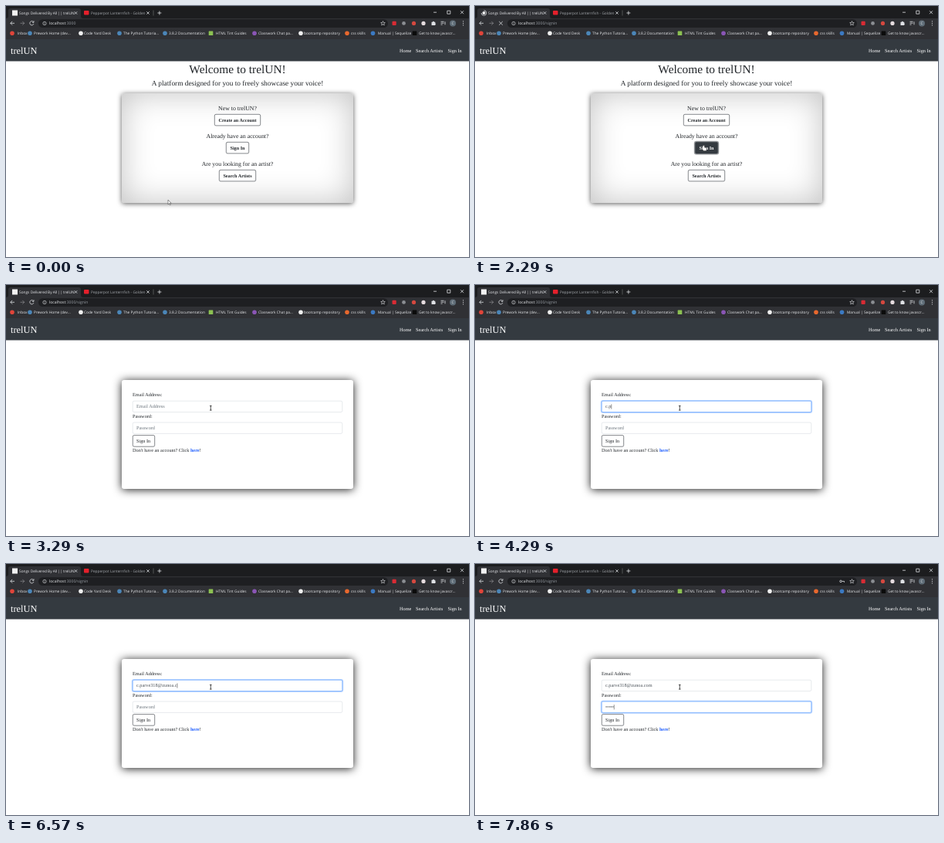
These frames come from a looping animation (600 px wide and 325 px high, 8 s). An HTML page:

```html
<!DOCTYPE html>
<html lang="en">
<head>
<meta charset="utf-8">
<title>trelUN</title>
<style>
  html, body { margin: 0; width: 100%; height: 100%; overflow: hidden; background: #fff; }
  .card { position: absolute; left: 150px; width: 300px; border-radius: 3px; background: #fff; }
  #homeCard { top: 113px; height: 142px; box-shadow: inset 0 0 42px #c2c2c2, 0 1px 6px rgba(0,0,0,.65); }
  #signCard { top: 123px; height: 141px; box-shadow: 0 1px 12px rgba(0,0,0,.9); }
  svg { position: absolute; left: 0; top: 0; }
  text { font-family: "Liberation Serif", serif; font-size: 6.25px; fill: #212529; text-rendering: geometricPrecision; white-space: pre; }
  .ui text { font-family: "Open Sans", "Noto Sans", sans-serif; font-size: 4.8px; fill: #e8eaed; }
  .line { fill: none; stroke: #dfe1e5; stroke-width: .8; }
  .mid text { text-anchor: middle; }
  .mid .q { font-size: 7.82px; }
  .mid .b { font-size: 6.2px; font-weight: bold; }
  .btn { fill: #fff; stroke: #343a40; stroke-width: .6; }
  .nav text { font-size: 6.3px; fill: #fff; }
  .field { fill: #fff; stroke: #ced4da; stroke-width: .5; }
  .field.on { stroke: #80b4ff; stroke-width: .9; }
  .halo { fill: none; stroke: #5b9bff; stroke-opacity: .45; stroke-width: 1.4; }
  .value { fill: #495057; }
  .value.empty { fill: #6c757d; }
</style>
</head>
<body>
<div class="card" id="homeCard"></div>
<div class="card" id="signCard"></div>
<svg width="600" height="325" viewBox="0 0 600 325">
  <g class="ui">
    <rect width="600" height="17" fill="#1c1d1f"/>
    <path d="M0 16 Q3 16 3 13 V6 Q3 3 6 3 H94 Q97 3 97 6 V13 Q97 16 100 16 H600 V43 H0Z" fill="#303135"/>
    <rect id="icon" x="8" y="5.5" width="7" height="7" fill="#f2f2f2"/>
    <g id="spinner">
      <circle cx="11.5" cy="9" r="2" fill="#f2f2f2"/>
      <path d="M11.5 5.7 A3.3 3.3 0 1 1 8.2 9" class="line"/>
    </g>
    <clipPath id="tabs"><path d="M17 0H89V17H17ZM109 0H183V17H109Z"/></clipPath>
    <g clip-path="url(#tabs)">
      <text x="17" y="10.8">Songs Delivered By All || trelUN</text>
      <text x="110" y="10.8" style="fill:#a3a7ac">Pepperpot Lanternfish - Golden</text>
    </g>
    <rect x="101" y="6" width="6.5" height="5.5" rx="1" fill="#e5202b"/>
    <path class="line" d="M88.8 7.3l3.4 3.4m0-3.4l-3.4 3.4M182.3 7.3l3.4 3.4m0-3.4l-3.4 3.4M196.4 9h5M198.9 6.5v5"/>
    <path class="line" stroke-width=".5" d="M191 5.5v7" opacity=".35"/>
    <path class="line" d="M554 8.2h4M571.8 6.2h4v4h-4zM589 6.2l4 4m0-4l-4 4"/>
    <path class="line" d="M11 22.3H5.8m2.4-2.4l-2.4 2.4 2.4 2.4"/>
    <path class="line" d="M18.5 22.3h5.2m-2.4-2.4l2.4 2.4-2.4 2.4" opacity=".45"/>
    <path id="reload" class="line" d="M35.6 20.8a2.6 2.6 0 1 0 .3 2.3M36 19.3v2h-2"/>
    <path id="stop" class="line" d="M31.2 20l4.6 4.6m0-4.6l-4.6 4.6"/>
    <rect x="42" y="17.2" width="453" height="10.8" rx="5.4" fill="#1e1f22"/>
    <circle class="line" cx="50" cy="22.5" r="2.2" style="stroke-width:.6"/>
    <path class="line" d="M50 22.2v1.4M50 21v.5" style="stroke-width:.6"/>
    <text x="56" y="24.4" style="font-size:5.1px">localhost<tspan id="path" fill="#9aa0a6"></tspan></text>
    <g id="key">
      <circle class="line" cx="474" cy="22.4" r="1.3"/><path class="line" d="M475.3 22.4h3.2v1.4"/>
    </g>
    <path class="line" style="stroke-width:.6" d="M488.5 19.6l.8 1.9 2 .1-1.6 1.3.6 2-1.8-1.1-1.8 1.1.6-2-1.6-1.3 2-.1z"/>
    <rect x="500.5" y="19.7" width="5.2" height="5.2" rx="1" fill="#d92b34"/>
    <circle cx="515.5" cy="22.4" r="2.4" fill="#8b8e93"/>
    <circle cx="528.5" cy="22.4" r="2.6" fill="#d5483f"/>
    <circle cx="541" cy="22.4" r="2.6" fill="#e6dcdf"/>
    <path d="M551.5 20.8h1.4a1 1 0 0 1 2 0h1.4v1.6a1 1 0 0 1 0 1.8v.9h-4.8z" fill="#dfe1e5"/>
    <path class="line" d="M563.5 20.3h4M563.5 22.2h4M563.5 24.1h2M569 20.3v4"/>
    <circle cx="579" cy="22.4" r="4" fill="#5f6d78"/>
    <text x="577.5" y="24.1">C</text>
    <path d="M592.5 19.8h.01M592.5 22.3h.01M592.5 24.8h.01" stroke="#dfe1e5" stroke-width="1.2" stroke-linecap="round"/>
    <g id="marks"></g>
  </g>

  <rect y="43" width="600" height="28.5" fill="#343a40"/>
  <g class="nav">
    <text x="6" y="61.7" style="font-size:12.4px">trelUN</text>
    <text x="510" y="59.6">Home</text>
    <text x="531" y="59.6">Search Artists</text>
    <text x="572.4" y="59.6">Sign In</text>
  </g>

  <g id="home" class="mid">
    <text x="300" y="86.7" style="font-size:15.4px">Welcome to trelUN!</text>
    <text x="300" y="102.6" style="font-size:9.33px">A platform designed for you to freely showcase your voice!</text>
    <text class="q" x="300" y="135">New to trelUN?</text>
    <rect class="btn" x="270.3" y="140.3" width="59.4" height="14.6" rx="1.7"/>
    <text class="b" x="300" y="149.7">Create an Account</text>
    <text class="q" x="300" y="171">Already have an account?</text>
    <rect id="ring" x="284.6" y="175.6" width="30.8" height="16" rx="2.2" fill="none" stroke="#343a40" stroke-opacity=".5" stroke-width="1.6"/>
    <rect id="enter" class="btn" x="285.3" y="176.3" width="29.4" height="14.6" rx="1.7"/>
    <text id="enterText" class="b" x="300" y="185.7">Sign In</text>
    <text class="q" x="300" y="207">Are you looking for an artist?</text>
    <rect class="btn" x="276.3" y="212.3" width="47.4" height="14.6" rx="1.7"/>
    <text class="b" x="300" y="221.7">Search Artists</text>
  </g>

  <g id="sign">
    <text x="164" y="144.2">Email Address:</text>
    <text x="164" y="172">Password:</text>
    <g id="mail"></g>
    <g id="pass"></g>
    <rect class="btn" x="164.3" y="194.6" width="28.4" height="14.6" rx="1.7"/>
    <text x="169" y="204.1" fill="#343a40">Sign In</text>
    <text x="164" y="216.3">Don't have an account? Click <tspan fill="#1f5eff" font-weight="bold">here</tspan>!</text>
  </g>

  <g id="cursor" stroke="#333" stroke-width=".5">
    <path id="arrow" d="M0 0V5.8L1.4 4.6 2.4 6.7 3.3 6.3 2.3 4.3H4.1Z" fill="#fff"/>
    <path id="hand" d="M-.7 .5Q0-.6 .7 .5V2.6L3.2 3.2Q3.8 3.5 3.6 4.4L3 7H-.8L-2.4 4.3Q-2-.3.4-.7 4.2Z" fill="#fff" />
    <path id="beam" d="M-1.3-2.8H1.3M0-2.8V2.8M-1.3 2.8H1.3" fill="none" stroke="#222" stroke-width=".8"/>
  </g>
</svg>
<script>
const $ = id => document.getElementById(id);
const show = (id, on) => { $(id).style.display = on ? "" : "none"; };

// Bookmarks: icon x, colour, square?, label x, label
const marks = [
  [8, "#e0453a", 0, 15, "Inbox"],
  [31, "#4b86b8", 0, 36, "Prework Home (dev…"],
  [97, "#f0f0f0", 0, 101, "Code Yard Desk"],
  [147, "#4b86b8", 0, 152, "The Python Tutoria…"],
  [206, "#4b86b8", 0, 211, "3.8.2 Documentation"],
  [265.5, "#8cc152", 1, 272, "HTML Tint Guides"],
  [322, "#8a55b5", 0, 327, "Classwork Chat pa…"],
  [382, "#f0f0f0", 0, 386, "bootcamp repository"],
  [442, "#e8682e", 0, 447, "css skills"],
  [475.5, "#3b79c2", 0, 482, "Manual | Sequelize"],
  [529.5, "#0b0b0b", 1, 535, "Get to know javascr…"]
];
$("marks").innerHTML = marks.map(([x, c, square, tx, label]) =>
  `<rect x="${x - 2.8}" y="32.4" width="5.6" height="5.6" rx="${square ? .5 : 2.8}" fill="${c}"/>` +
  `<text x="${tx}" y="36.9">${label}</text>`).join("");

function makeField(id, y, hint) {
  const g = $(id);
  g.innerHTML =
    `<rect class="halo" x="163.5" y="${y - .6}" width="273" height="15.6" rx="2.2"/>` +
    `<rect class="field" x="164.2" y="${y}" width="271.6" height="14.4" rx="1.8"/>` +
    `<text class="value" x="169" y="${y + 9.1}"></text>` +
    `<path d="M0 ${y + 4.2}v6.2" stroke="#222" stroke-width=".5"/>`;
  const [halo, box, text, caret] = g.children;
  return (value, focused) => {
    text.textContent = value || hint;
    text.classList.toggle("empty", !value);
    box.classList.toggle("on", focused);
    halo.style.display = caret.style.display = focused ? "" : "none";
    const end = value && focused ? text.getComputedTextLength() : 0;
    caret.setAttribute("transform", `translate(${169.3 + end} 0)`);
  };
}
const setMail = makeField("mail", 150.2, "Email Address");
const setPass = makeField("pass", 178, "Password");

const address = "c.parve318@zunoa.com";
const loop = 8000, rate = 7;
const clamp = (v, lo, hi) => Math.min(hi, Math.max(lo, v));
const ease = p => p * p * (3 - 2 * p);

// Pointer keys: step, x, y
const stops = [[0, 210, 251], [8, 215.6, 185], [14, 296.8, 180.5], [17, 296.8, 180.5], [23, 265.3, 159.3]];
function pointer(k) {
  let i = 0;
  while (i < stops.length - 2 && k > stops[i + 1][0]) i++;
  const [a, ax, ay] = stops[i], [b, bx, by] = stops[i + 1];
  const p = ease(clamp((k - a) / (b - a), 0, 1));
  return [ax + (bx - ax) * p, ay + (by - ay) * p];
}

function typed(k) {
  if (k < 27) return 0;
  if (k < 29) return 1;
  return clamp(k - (k < 39 ? 27 : 28), 0, address.length);
}

function draw(t) {
  const k = Math.floor((t + 3) * rate / 1000);
  const signin = k >= 17, loading = k === 16, hover = k >= 13 && !signin;
  for (const id of ["home", "homeCard"]) show(id, !signin);
  for (const id of ["sign", "signCard"]) show(id, signin);
  show("icon", !loading);
  show("reload", !loading);
  show("spinner", loading);
  show("stop", loading);
  show("key", k >= 50);
  $("path").textContent = k >= 16 ? ":3000/signin" : ":3000";

  show("ring", k >= 15);
  $("enter").style.fill = hover ? "#343a40" : "#fff";
  $("enterText").style.fill = hover ? "#fff" : "";

  const tab = k >= 50;
  setMail(address.slice(0, typed(k)), k >= 25 && !tab);
  setPass("•".repeat(clamp(k - 50, 0, 5)), tab);

  const [x, y] = pointer(k), beam = signin && y < 165;
  $("cursor").setAttribute("transform", `translate(${x} ${y})`);
  show("hand", hover);
  show("beam", beam);
  show("arrow", !hover && !beam);
}

function tick() {
  draw(performance.now() % loop);
  requestAnimationFrame(tick);
}
tick();
</script>
</body>
</html>
```
